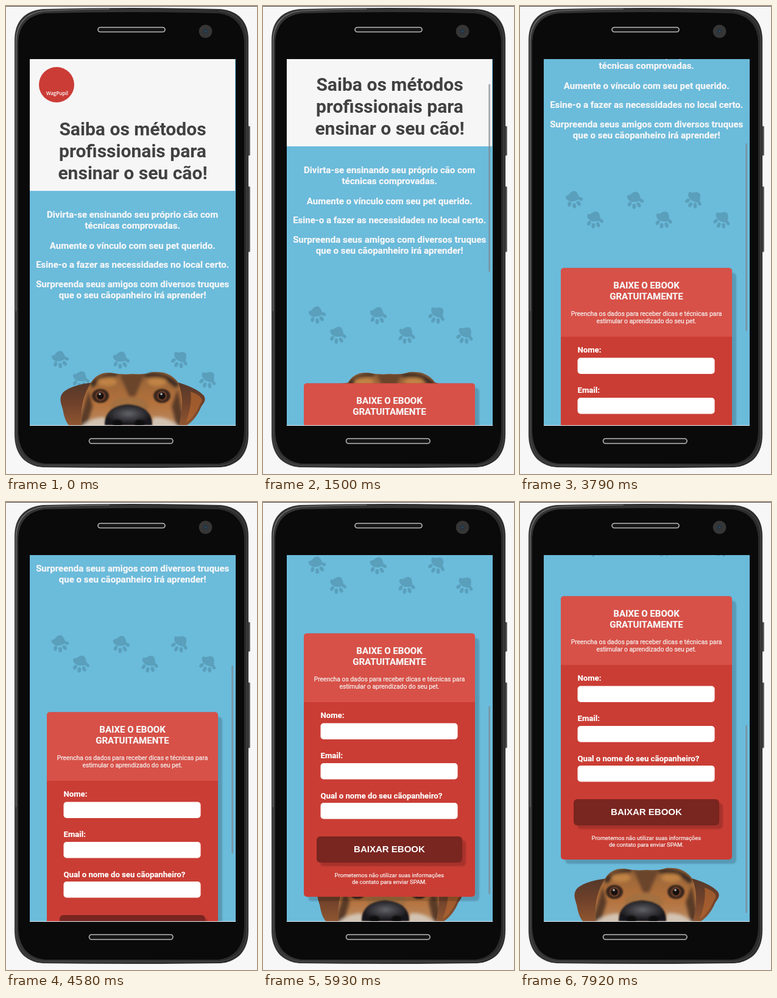
Recreate the animation shown at these times as an HTML page. Size 412 by 767 pixels, loop 8000 ms.

```html
<!DOCTYPE html>
<html lang="pt">
<head>
<meta charset="utf-8">
<title>Página móvel</title>
<style>
html, body { margin: 0; width: 100%; height: 100%; overflow: hidden; background: #f7f7f7; }
svg { display: block; width: 100vw; height: 100vh; }
text { font-family: Roboto, sans-serif; text-anchor: middle; }
.title { font-size: 30.04px; font-weight: 700; fill: #414142; }
.lead { font-size: 15.02px; font-weight: 700; fill: #f7f7f7; }
.label { font-size: 13.15px; font-weight: 700; fill: #fff; text-anchor: start; }
.hint { font-size: 10.33px; fill: #f7f7f7; }
.note { font-size: 9.39px; fill: #f7f7f7; }
.lead, .label, .hint, .note { stroke: #f7f7f7; stroke-width: .2px; }
.button { font: 700 15.02px "Liberation Sans", Arial, sans-serif; fill: #fff; }
.brand { font: 600 8px "Open Sans", sans-serif; fill: #fff; }
</style>
</head>
<body>
<svg viewBox="0 0 412 767">
  <defs>
    <clipPath id="screen"><rect x="39" y="87" width="338" height="600"/></clipPath>
    <linearGradient id="rim" x2="1" y2="0.1">
      <stop offset="0" stop-color="#343434"/><stop offset=".5" stop-color="#333"/>
      <stop offset="1" stop-color="#2b2b2b"/>
    </linearGradient>
    <linearGradient id="fur" x2="0" y2="1">
      <stop offset="0" stop-color="#8a5d38"/><stop offset=".3" stop-color="#a36a3a"/>
      <stop offset=".6" stop-color="#b4713c"/><stop offset="1" stop-color="#b98a60"/>
    </linearGradient>
    <linearGradient id="ear" x2="0" y2="1">
      <stop offset="0" stop-color="#54382a"/><stop offset=".5" stop-color="#70412a"/>
      <stop offset="1" stop-color="#8f5631"/>
    </linearGradient>
    <radialGradient id="nose" cy=".45">
      <stop offset="0" stop-color="#626369"/><stop offset=".5" stop-color="#3b3b40"/>
      <stop offset="1" stop-color="#18171a"/>
    </radialGradient>
    <filter id="soft" x="-20%" y="-20%" width="140%" height="140%"><feGaussianBlur stdDeviation="1"/></filter>
    <filter id="fuzzy" x="-30%" y="-30%" width="160%" height="160%"><feGaussianBlur stdDeviation="2.5"/></filter>
    <clipPath id="head"><path d="M139 618C146 606 156 600 172 601Q190 605 208 603Q226 605 240 600C258 598 274 604 283 618C292 640 290 665 284 687H124C122 655 128 636 139 618Z"/></clipPath>
    <g id="paw">
      <path d="M-10 -10C-4 -8 -2 -14 4 -13C10 -12 9 -6 10 -3C11 3 5 4 0 3C-7 3 -14 -5 -10 -10Z"/>
      <ellipse cx="-9" cy="5" rx="2.8" ry="4.2" transform="rotate(35 -9 5)"/>
      <ellipse cx="-2.5" cy="10" rx="2.9" ry="4.4" transform="rotate(10 -2.5 10)"/>
      <ellipse cx="5.5" cy="9" rx="2.9" ry="4.4" transform="rotate(-20 5.5 9)"/>
      <ellipse cx="11" cy="3" rx="2.7" ry="4.1" transform="rotate(-45 11 3)"/>
    </g>
  </defs>

  <rect width="412" height="767" fill="#f7f7f7"/>
  <rect width="412" height="1" fill="#4a4a4a"/>

  <g fill="#4b4b4b" stroke="#777" stroke-width=".6">
    <rect x="396" y="197" width="4.5" height="48" rx="1"/>
    <rect x="396" y="296" width="4.5" height="107" rx="1"/>
  </g>
  <path d="M14 56C14 26 30 8 60 5Q206 1 352 5C382 8 398 26 398 56V702C398 734 382 753 352 756Q206 758 60 756C30 753 14 734 14 702Z" fill="url(#rim)"/>
  <path d="M16.500 500V58C17 29 33 11 62 8Q116 5 170 5" fill="none" stroke="#777" stroke-width="1.200"/>
  <path d="M350 8C379 11 395 29 395.500 58V702C395 732 379 750 350 753H62C33 750 17 732 16.500 702V500" fill="none" stroke="#4c4c4c" stroke-width="1"/>
  <path d="M20 60C21 32 36 15 64 12Q206 8 348 12C375 15 390 32 391 60V697C390 729 375 747 348 750H64C36 747 21 729 20 697Z" fill="#0a0a0a"/>
  <g fill="#161616" stroke="#b9b9b9" stroke-width="1.600">
    <rect x="151" y="35" width="110" height="7.500" rx="3.750"/>
    <rect x="136.500" y="709" width="137.500" height="8" rx="4"/>
  </g>
  <circle cx="327.500" cy="41.500" r="10.800" fill="#363636"/>
  <circle cx="327.500" cy="41.500" r="4" fill="#2b343d"/>
  <circle cx="327.500" cy="41.500" r="1.300" fill="#1d5173"/>
  <rect x="39" y="687" width="338" height="1" fill="#e8eef1"/>

  <g clip-path="url(#screen)">
    <rect x="39" y="87" width="338" height="600" fill="#6bbbdb"/>

    <g id="page">
      <rect x="39" y="87" width="337" height="216" fill="#f6f6f6"/>
      <circle cx="83" cy="129" r="29" fill="#cb3c36"/>
      <text class="brand" x="84" y="146">WagPupil</text>
      <g id="copy"></g>
      <g id="paws" fill="#5a9fbb"></g>
    </g>

    <g id="dog">
      <path d="M142 617C124 619 105 624 95 632C86 641 90 650 93 660C95 672 98 681 103 687H140Z" fill="url(#ear)"/>
      <path d="M279 616C298 621 318 630 325 639C330 648 322 652 319 660C313 673 305 682 297 687H272Z" fill="url(#ear)"/>
      <path d="M303 632C320 638 325 645 319 652C312 668 304 678 295 683C302 664 305 648 303 632Z" fill="#b4652f" opacity=".7"/>
      <g clip-path="url(#head)">
        <rect x="120" y="596" width="170" height="92" fill="url(#fur)"/>
        <g filter="url(#fuzzy)">
          <path d="M138 618Q156 600 186 602L180 607Q158 606 142 626Z" fill="#3b2b22"/>
          <path d="M224 603Q262 596 284 620L278 626Q262 607 228 608Z" fill="#3b2b22"/>
          <path d="M186 602H228L212 640H202Z" fill="#6a452c"/>
          <ellipse cx="166" cy="616" rx="16" ry="7" fill="#c08345"/>
          <ellipse cx="248" cy="616" rx="16" ry="7" fill="#c08345"/>
          <path d="M136 630L142 656L132 690H118Z" fill="#5a3b28"/>
          <path d="M282 628L272 656L280 690H294Z" fill="#5a3b28"/>
          <path d="M122 690Q140 674 162 674L168 690Z" fill="#d3c3b2"/>
          <path d="M284 690Q266 672 242 674L236 690Z" fill="#d3c3b2"/>
          <ellipse cx="203" cy="655" rx="32" ry="14" fill="#a3703f"/>
        </g>
      </g>
      <g id="eyes"></g>
      <path d="M162 687C162 668 172 655 200 653C230 655 240 668 240 687Z" fill="url(#nose)" filter="url(#soft)"/>
      <ellipse cx="183" cy="684" rx="8" ry="6" fill="#0b0b0d" filter="url(#soft)"/>
      <ellipse cx="219" cy="684" rx="8" ry="6" fill="#0b0b0d" filter="url(#soft)"/>
    </g>

    <g id="form">
      <rect x="74" y="699" width="281" height="431" rx="6" fill="#000" opacity=".17" filter="url(#soft)"/>
      <rect x="67" y="691.500" width="281" height="431.500" rx="5" fill="#ca3d34"/>
      <path d="M67 804V696.500q0 -5 5 -5H343q5 0 5 5V804Z" fill="#d75148"/>
      <g id="fields" fill="#fff"></g>
      <rect x="94" y="1030" width="239" height="43" rx="6" fill="#000" opacity=".17" filter="url(#soft)"/>
      <rect x="88" y="1024" width="239" height="43" rx="6" fill="#792520"/>
      <g id="formCopy"></g>
    </g>

    <rect id="bar" x="370.300" width="2.600" height="307.500" rx="1" fill="#7c838c" opacity=".7"/>
  </g>
</svg>
<script>
const LOOP = 8000;
const NS = "http://www.w3.org/2000/svg";
const $ = id => document.getElementById(id);

function add(parent, tag, attrs, content = "") {
  const el = document.createElementNS(NS, tag);
  for (const k in attrs) el.setAttribute(k, attrs[k]);
  el.textContent = content;
  $(parent).appendChild(el);
}
const write = (parent, cls, x, lines) =>
  lines.forEach(([y, s]) => add(parent, "text", { class: cls, x, y }, s));

write("copy", "title", 208, [
  [212, "Saiba os métodos"], [248, "profissionais para"], [284, "ensinar o seu cão!"]
]);
write("copy", "lead", 207.7, [
  [347, "Divirta-se ensinando seu próprio cão com"],
  [365, "técnicas comprovadas."],
  [398, "Aumente o vínculo com seu pet querido."],
  [429, "Esine-o a fazer as necessidades no local certo."],
  [461, "Surpreenda seus amigos com diversos truques"],
  [479, "que o seu cãopanheiro irá aprender!"]
]);
write("formCopy", "lead", 207.5, [[725, "BAIXE O EBOOK"], [743, "GRATUITAMENTE"]]);
write("formCopy", "hint", 207.5, [
  [770, "Preencha os dados para receber dicas e técnicas para"],
  [782, "estimular o aprendizado do seu pet."]
]);
write("formCopy", "label", 94.5, [
  [830, "Nome:"], [896, "Email:"], [962, "Qual o nome do seu cãopanheiro?"]
]);
write("formCopy", "button", 207.5, [[1050, "BAIXAR EBOOK"]]);
write("formCopy", "note", 207.3, [
  [1091, "Prometemos não utilizar suas informações"],
  [1102, "de contato para enviar SPAM."]
]);

for (const y of [838.5, 904, 969])
  add("fields", "rect", { x: 94.5, y, width: 225, height: 26.4, rx: 5 });

for (const [x, y, turn] of [[88, 579, -20], [122, 612, -5], [188, 580, -10],
                            [235, 612, 0], [285, 579, 18], [331, 612, 14]])
  add("paws", "use", { href: "#paw", transform: `translate(${x} ${y}) rotate(${turn})` });

for (const x of [155, 256]) {
  add("eyes", "ellipse", { cx: x, cy: 639, rx: 14, ry: 11.5, fill: "#3a281e", filter: "url(#soft)" });
  add("eyes", "circle", { cx: x, cy: 639, r: 8.5, fill: "#633a27" });
  add("eyes", "circle", { cx: x, cy: 639, r: 5.5, fill: "#17110f" });
  add("eyes", "circle", { cx: x - 1, cy: 636, r: 1.8, fill: "#b7c0c6" });
}

// Moments at which the screen refreshes: [first, last, count]
const ticks = [0];
for (const [a, b, n] of [[120, 1110, 8], [1260, 1500, 3], [1650, 2190, 5], [2340, 2730, 4],
                         [2850, 3240, 4], [3390, 3790, 4], [3910, 4430, 5], [4580, 5240, 6],
                         [5360, 5510, 2], [5660, 6570, 8], [6720, 6840, 2]])
  for (let i = 0; i < n; i++) ticks.push(Math.round((a + (b - a) * i / (n - 1)) / 10) * 10);

const keys = [[0, 0], [1500, 73], [2730, 180], [3790, 262], [5240, 418], [6570, 526], [6840, 545]];

function slope(i) {
  const a = keys[Math.max(i - 1, 0)], b = keys[Math.min(i + 1, keys.length - 1)];
  return (b[1] - a[1]) / (b[0] - a[0]);
}

function scrollAt(t) {
  if (t >= 7920) return 537;
  const now = ticks.filter(k => k <= t).pop();
  const i = Math.min(keys.filter(k => k[0] <= now).length - 1, keys.length - 2);
  const [t0, y0] = keys[i], [t1, y1] = keys[i + 1];
  const d = t1 - t0, u = (now - t0) / d, v = 1 - u;
  return Math.round(y0 * v * v * (1 + 2 * u) + y1 * u * u * (3 - 2 * u)
    + d * u * v * (slope(i) * v - slope(i + 1) * u));
}

function draw(t) {
  const y = scrollAt(t);
  const move = `translate(0 ${-y})`;
  $("page").setAttribute("transform", move);
  $("form").setAttribute("transform", move);
  $("bar").setAttribute("y", 90.5 + y * 0.513);
  const shown = t >= 120 && t < 7400 || t >= 7920;
  $("bar").setAttribute("visibility", shown ? "visible" : "hidden");
}

const start = performance.now();
function frame() {
  draw((performance.now() - start) % LOOP);
  requestAnimationFrame(frame);
}
draw(0);
requestAnimationFrame(frame);
</script>
</body>
</html>
```
